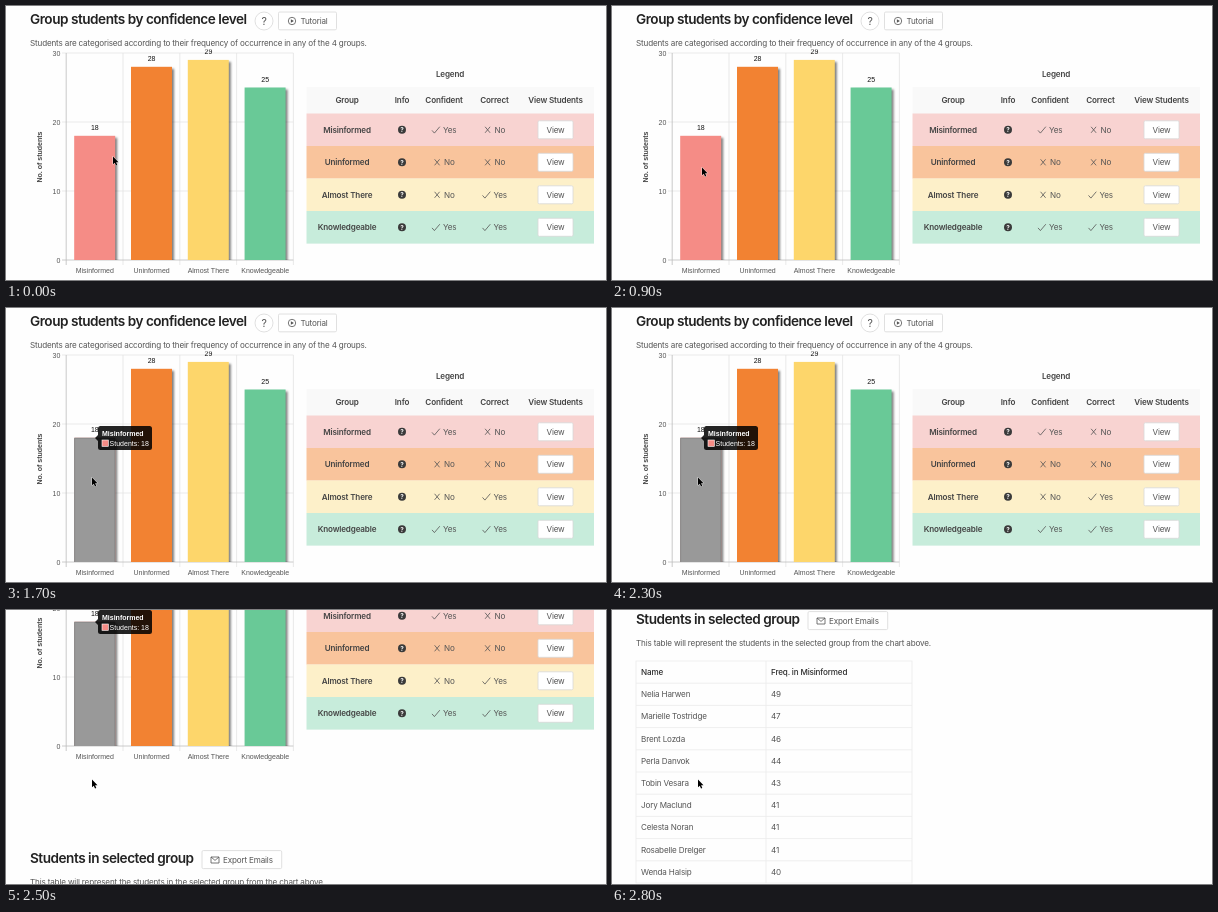
Animation of 600 by 274 pixels, one loop 3400 ms. Source, as an HTML page:

```html
<!DOCTYPE html>
<html lang="en">
<head>
<meta charset="utf-8">
<title>Students by confidence level</title>
<style>
  html, body { margin: 0; width: 100%; height: 100%; overflow: hidden; background: #fefefe; }
  svg { display: block; width: 600px; height: 274px; }
  text { font: 400 8.1px Inter, sans-serif; letter-spacing: -.02em; fill: #555; }
  .mid { text-anchor: middle; }
  .end { text-anchor: end; }
  .semi { font-weight: 600; fill: #444; }
  .med { font-weight: 500; fill: #2d2d2d; }
  .h1 { font-size: 13.6px; font-weight: 600; letter-spacing: -.035em; fill: #222; }
  .chart text { font: 400 7px "Liberation Sans", Arial, sans-serif; letter-spacing: 0; }
  .chart .value { fill: #111; }
  .chart .bold { font-weight: 700; fill: #444; }
  .chart .tip { fill: #fff; }
  .chart .tip.bold { fill: #fff; }
  .bars rect { filter: drop-shadow(2.5px 2px 1.3px rgba(0, 0, 0, .5)); }
  .line { fill: none; stroke: #555; stroke-width: .8; }
  .btn { fill: #fff; stroke: #d9d9d9; stroke-width: .8; }
  .grid { fill: none; stroke: #e4e4e4; stroke-width: .8; }
  .axis { fill: none; stroke: #bdbdbd; stroke-width: .8; }
  .cells { fill: none; stroke: #ebebeb; stroke-width: .8; }
</style>
</head>
<body>
<svg id="stage" viewBox="0 0 600 274"></svg>
<script>
const LOOP = 3400, STEP = 100;

const groups = [
  { name: "Misinformed", n: 18, bar: "#f58c86", row: "#f8d3d1", marks: [1, 0] },
  { name: "Uninformed", n: 28, bar: "#f28232", row: "#f9c49c", marks: [0, 0] },
  { name: "Almost There", n: 29, bar: "#fdd66b", row: "#fdf0c9", marks: [0, 1] },
  { name: "Knowledgeable", n: 25, bar: "#69c997", row: "#c7ecdb", marks: [1, 1] }
];
const students = [
  ["Nelia Harwen", 49], ["Marielle Tostridge", 47], ["Brent Lozda", 46],
  ["Perla Danvok", 44], ["Tobin Vesara", 43], ["Jory Maclund", 41],
  ["Celesta Noran", 41], ["Rosabelle Drelger", 41], ["Wenda Halsip", 40]
];

// y is the vertical centre of the line
const text = (x, y, s, cls = "", drop = 3) =>
  `<text x="${x}" y="${y + drop}" class="${cls}">${s}</text>`;
const rect = (x, y, w, h, attrs) =>
  `<rect x="${x}" y="${y}" width="${w}" height="${h}" ${attrs}/>`;
const path = (d, cls) => `<path d="${d}" class="${cls}"/>`;
const button = (x, y, w, h) => rect(x, y, w, h, 'rx="1.3" class="btn"');

function header() {
  return text(24, 13.5, "Group students by confidence level", "h1", 4.7) +
    '<circle cx="258" cy="15" r="9" class="btn"/>' +
    '<text x="258" y="18.8" class="mid" style="font-size:10.5px">?</text>' +
    button(272.5, 6, 58, 17.8) +
    '<circle cx="286" cy="15" r="3.7" class="line"/>' +
    '<path d="M284.9 13.2L287.9 15L284.9 16.8Z" fill="#555"/>' +
    text(294.5, 15, "Tutorial") +
    text(24, 37, "Students are categorised according to their frequency of occurrence in any of the 4 groups.");
}

function chart() {
  const base = 254, unit = 6.9, pitch = 56.8;
  const top = n => base - n * unit;
  let lines = "", labels = "", bars = "";
  for (const n of [10, 20, 30]) lines += `M56 ${top(n)}H287.3`;
  for (let i = 1; i < 5; i++) lines += `M${60.2 + i * pitch} 47V259`;
  for (const n of [0, 10, 20, 30]) labels += text(54.3, top(n), n, "end", 2.5);
  groups.forEach((g, i) => {
    const x = 68.2 + i * pitch, mid = x + 20.6;
    bars += rect(x, top(g.n), 41, g.n * unit, `fill="${g.bar}"`);
    labels += text(mid, 264, g.name, "mid", 2.6) +
      text(mid, top(g.n) - 8.5, g.n, "mid value", 2.5);
  });
  return `<g class="chart" clip-path="url(#canvas)">
    ${path(lines, "grid")}${path("M60.2 47V259M56 254H287.3", "axis")}
    <g class="bars" clip-path="url(#plot)">${bars}</g>
    <g id="hover">${rect(68.2, 129.8, 41, 124.2, 'fill="#999"')}
      <path d="M68.7 254V130.3H108.7V254" fill="none" stroke="#8b8b8b"/></g>
    ${labels}
    <text class="mid bold" transform="translate(36 151) rotate(-90)">No. of students</text>
    <g id="tooltip">
      <path d="M89 130l3-3V120.500q0-2.500 2.500-2.500h49q2.500 0 2.500 2.500v19q0 2.500-2.500 2.500h-49q-2.500 0-2.500-2.500V133z" fill="#000" fill-opacity=".86"/>
      ${text(96, 125, "Misinformed", "tip bold", 2.5)}
      ${rect(96, 132, 6.4, 6.4, 'fill="#f58c86" stroke="#fff" stroke-width=".6"')}
      ${text(103.6, 135, "Students: 18", "tip", 2.5)}
    </g></g>`;
}

function mark(x, y, yes) {
  const icon = yes
    ? `M${x - 12} ${y + .6}l2.400 2.700l5.400-6.400`
    : `M${x - 9.4} ${y - 3}l5 6m0-6l-5 6`;
  return path(icon, "line") + text(yes ? x - 1 : x, y, yes ? "Yes" : "No");
}

function legend() {
  let out = text(444, 68, "Legend", "mid semi") +
    rect(300.5, 81, 287.5, 26.7, 'fill="#f9f9f9"');
  const heads = { Group: 341, Info: 396, Confident: 438, Correct: 488.5, "View Students": 549.5 };
  for (const h in heads) out += text(heads[h], 94, h, "mid semi");
  groups.forEach((g, i) => {
    const y = 107.5 + i * 32.5, mid = y + 16.3;
    out += rect(300.5, y, 287.5, 32.6, `fill="${g.row}"`) +
      text(341, mid, g.name, "mid semi") +
      `<circle cx="396" cy="${mid}" r="4" fill="#3a3a3a"/>` +
      `<text x="396" y="${mid + 2.3}" class="mid" style="font-size:6.3px;font-weight:700;fill:#fff">?</text>` +
      mark(438, mid, g.marks[0]) + mark(488.5, mid, g.marks[1]) +
      button(532, mid - 9, 35, 18) + text(549.5, mid, "View", "mid");
  });
  return out;
}

function roster() {
  const top = 408, pitch = 22.2, rows = students.length + 1;
  let lines = `M154 ${top}v${rows * pitch}`;
  let out = text(24, 366, "Students in selected group", "h1", 4.7) +
    button(196, 358.6, 79.7, 18) +
    path("M205 365h8v6h-8zl4 3.400l4-3.400", "line") +
    text(217, 368, "Export Emails") +
    text(24, 389.5, "This table will represent the students in the selected group from the chart above.") +
    text(29, top + 11, "Name", "med") + text(159, top + 11, "Freq. in Misinformed", "med");
  students.forEach(([name, n], i) => {
    const y = top + (i + 1) * pitch;
    lines += `M24 ${y}h276`;
    out += text(29, y + 11, name) + text(159, y + 11, n);
  });
  return out + path(lines, "cells") + rect(24, top, 276, rows * pitch, 'class="cells"');
}

const stage = document.getElementById("stage");
stage.innerHTML = `<defs>
    <clipPath id="canvas"><rect x="24" y="43.500" width="270" height="230"/></clipPath>
    <clipPath id="plot"><rect x="60" y="43" width="232" height="211"/></clipPath>
  </defs>
  <g id="page">${header()}${chart()}${legend()}${roster()}</g>
  <path id="cursor" d="M0 0V7.800L1.800 6.200L3 9L4.300 8.400L3.100 5.700H5.500Z" fill="#000" stroke="#fff" stroke-width=".7" paint-order="stroke"/>`;
const [page, hover, tooltip, cursor] =
  ["page", "hover", "tooltip", "cursor"].map(id => document.getElementById(id));

// rows of [time, ...values]
const pointer = [[0, 107, 150.5], [400, 93, 152.5], [600, 90, 157], [1200, 90, 166], [1300, 90, 166.5], [1700, 86, 169.5]];
const scroll = [[2300, 0], [2400, 32], [2500, 118], [2600, 225], [2700, 312], [2800, 357]];
const fade = [[1200, 0], [1300, .36], [1400, .85], [1500, 1]];
const drift = [[1300, 19, -37], [1400, 5, -9], [1500, 1, -1], [1600, 0, 0]];

function at(table, t) {
  if (t <= table[0][0]) return table[0].slice(1);
  const i = table.findIndex(row => row[0] > t);
  if (i < 0) return table[table.length - 1].slice(1);
  const a = table[i - 1], b = table[i], k = (t - a[0]) / (b[0] - a[0]);
  return a.slice(1).map((v, j) => v + (b[j + 1] - v) * k);
}
const move = (el, x, y) => el.setAttribute("transform", `translate(${x} ${y})`);

function draw(ms) {
  const t = Math.floor(ms % LOOP / STEP) * STEP;
  const [shown] = at(fade, t);
  move(page, 0, -at(scroll, t)[0]);
  move(cursor, ...at(pointer, t));
  move(tooltip, ...at(drift, t));
  hover.setAttribute("opacity", shown);
  tooltip.setAttribute("opacity", shown);
}

const start = performance.now();
function tick() {
  draw(performance.now() - start);
  requestAnimationFrame(tick);
}
tick();
</script>
</body>
</html>
```
